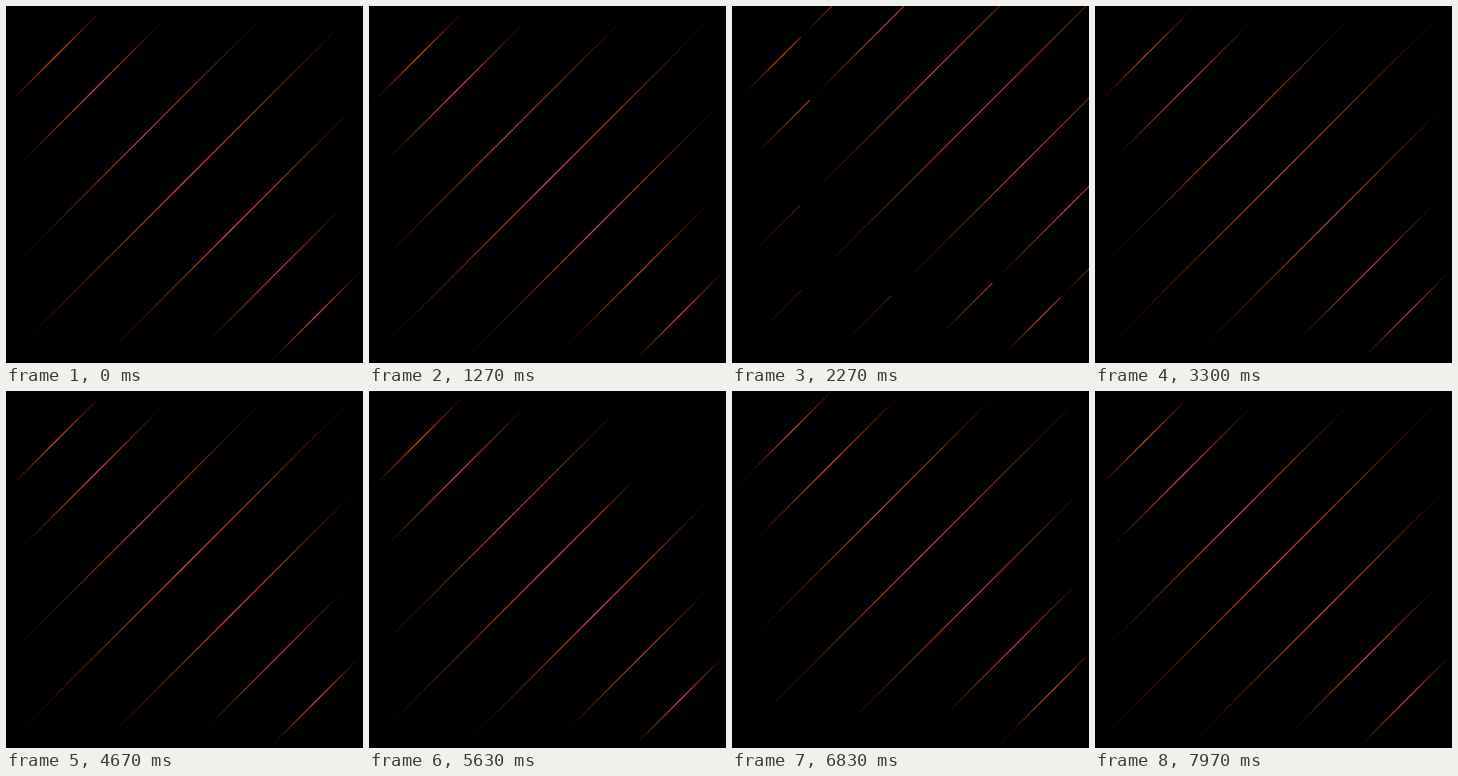
An HTML page with a canvas for the animation above (8000 ms loop, 357x357 px).

```html
<!DOCTYPE html>
<html>
<head>
<meta charset="utf-8">
<style>
html, body { margin: 0; height: 100%; background: #000; overflow: hidden; }
canvas { display: block; width: 100vw; height: 100vh; }
</style>
</head>
<body>
<canvas id="stage" width="357" height="357"></canvas>
<script>
const ctx = document.getElementById('stage').getContext('2d');
const SIZE = 357, CYCLE = 4000;

const warm = [[0, '#000'], [.09, '#1c0404'], [.2, '#3c1206'], [.32, '#6a2e08'],
  [.4, '#a83412'], [.45, '#bc2c3c'], [.5, '#d04a52'], [.57, '#c03048'],
  [.65, '#a83012'], [.74, '#6a3008'], [.84, '#381006'], [.92, '#1c0404'], [1, '#000']];
const orange = [[0, '#000'], [.1, '#280606'], [.3, '#7c2808'], [.5, '#c85008'],
  [.65, '#9c3010'], [.82, '#4a0c10'], [1, '#000']];
const pink = [[0, '#000'], [.1, '#240606'], [.3, '#74340a'], [.42, '#b03428'],
  [.52, '#d03c60'], [.62, '#b43020'], [.76, '#642408'], [.9, '#240606'], [1, '#000']];

// centre: middle of the diagonal on x = y; half: horizontal half length
const lines = [
  { centre: 50, half: 46, stops: orange },
  { centre: 86, half: 73, stops: pink },
  { centre: 133.7, half: 130, stops: warm },
  { centre: 177, half: 172, stops: warm },
  { centre: 224.5, half: 130, stops: warm },
  { centre: 268.7, half: 73, stops: pink },
  { centre: 310, half: 46, stops: pink }
];

// Distance of the incoming line from its resting place
function offsetAt(time) {
  const t = time % CYCLE;
  return t < 1590 ? 0 : 65 * Math.exp(-(t - 2270) / 300);
}

// Strokes part of a diagonal; the gradient may span a different range
function stroke(line, from, to, stops, start = from, end = to, width = 1.15) {
  if (to <= from) return;
  const point = d => [line.centre - line.half + d, line.centre + line.half - d];
  const paint = ctx.createLinearGradient(...point(start), ...point(end));
  for (const [at, color] of stops) paint.addColorStop(at, color);
  ctx.strokeStyle = paint;
  ctx.lineWidth = width;
  ctx.beginPath();
  ctx.moveTo(...point(from));
  ctx.lineTo(...point(to));
  ctx.stroke();
}

const shade = [[0, 'rgba(0,0,0,0)'], [.36, '#000'], [.64, '#000'], [1, 'rgba(0,0,0,0)']];

function draw(time) {
  const offset = offsetAt(time);
  ctx.fillStyle = '#000';
  ctx.fillRect(0, 0, SIZE, SIZE);
  for (const line of lines) {
    const length = line.half * 2;
    if (offset > 0) {
      stroke(line, 0, Math.min(offset, length), line.stops, 0, length);
      // dark bands running ahead of the incoming line
      for (const lead of [84, 267]) {
        const mid = offset - lead;
        stroke(line, mid - 55, mid + 55, shade, mid - 55, mid + 55, 4);
      }
    }
    stroke(line, offset, offset + length, line.stops);
  }
}

const begin = performance.now();
function tick() {
  draw((performance.now() - begin) % 8000);
  requestAnimationFrame(tick);
}
tick();
</script>
</body>
</html>
```
